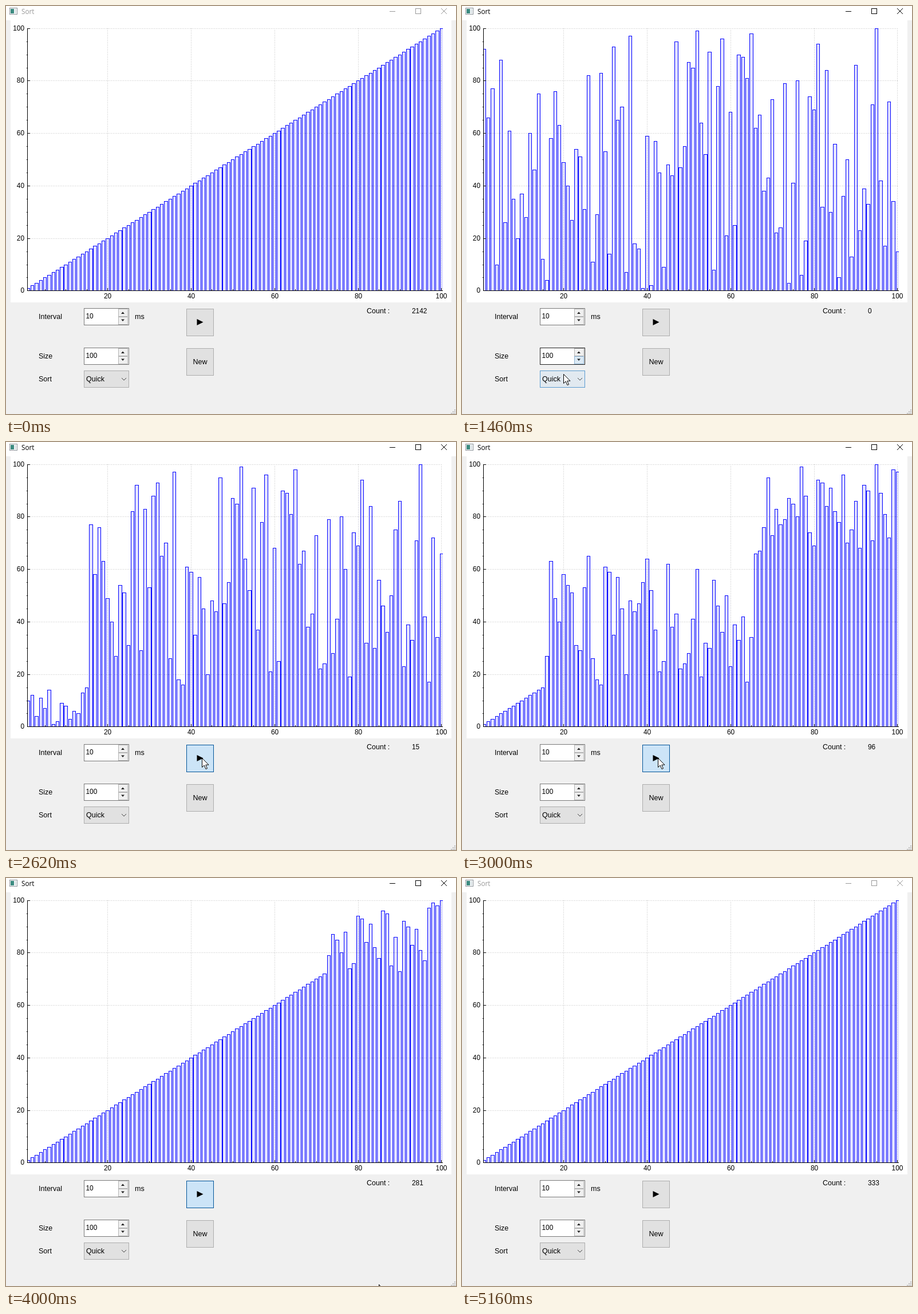
An HTML page with a canvas that plays this animation: 786 by 713 pixels, repeating every 5.32 s.

```html
<!DOCTYPE html>
<html lang="en">
<head>
<meta charset="utf-8">
<title>Sort</title>
<style>
  html, body { margin: 0; width: 100%; height: 100%; overflow: hidden; background: #f0f0f0; }
  canvas { display: block; }
</style>
</head>
<body>
<canvas id="stage" width="786" height="713"></canvas>
<script>
const ctx = document.getElementById('stage').getContext('2d');
const LOOP = 5320, TICK = 77;

const shuffled = [
  92, 66, 77, 10, 88, 26, 61, 35, 20, 37, 28, 60, 46, 75, 12, 4, 58, 76, 63, 49,
  40, 27, 54, 51, 31, 82, 11, 29, 83, 53, 14, 93, 65, 70, 7, 97, 18, 16, 1, 59,
  2, 57, 45, 9, 48, 44, 95, 47, 55, 87, 85, 99, 64, 52, 91, 8, 78, 96, 21, 68,
  25, 90, 89, 81, 98, 62, 67, 38, 43, 73, 22, 24, 79, 3, 41, 80, 6, 19, 74, 69,
  94, 32, 84, 30, 56, 5, 36, 50, 13, 86, 23, 39, 33, 71, 100, 42, 17, 72, 34, 15];
const sorted = shuffled.map((_, i) => i + 1);

// Every swap of the quick sort; the shown count advances once per partition.
function recordSort(input) {
  const a = input.slice(), steps = [{ values: input, count: 0 }];
  let count = 0;
  const swap = (i, j) => {
    [a[i], a[j]] = [a[j], a[i]];
    steps.push({ values: a.slice(), count });
  };
  const sort = (lo, hi) => {
    if (lo >= hi) return;
    let i = lo;
    for (let j = lo; j < hi; j++) if (a[j] < a[hi]) swap(i++, j);
    swap(i, hi);
    count = steps.length - 1;
    steps[count].count = count;
    sort(lo, i - 1);
    sort(i + 1, hi);
  };
  sort(0, a.length - 1);
  return steps;
}
const steps = recordSort(shuffled);

// Keys are [tick, ...values]
const progress = [[31.7, 0], [34, 20], [38, 75], [39, 97], [52, 281], [58.4, 333]];
const pointer = [
  [4, 500, 690], [7, 400, 655], [10, 338, 624], [14, 338, 624], [16, 235, 612], [17, 206, 618],
  [19, 177, 643], [21, 178, 643], [24, 240, 610], [27, 366, 566], [30, 342, 552],
  [45.5, 342, 552], [52, 651, 710]];

function at(keys, n) {
  const next = keys.findIndex(k => k[0] > n);
  if (next < 0) return keys[keys.length - 1].slice(1);
  if (next === 0) return keys[0].slice(1);
  const a = keys[next - 1], b = keys[next], p = (n - a[0]) / (b[0] - a[0]);
  return a.slice(1).map((v, i) => v + (b[i + 1] - v) * p);
}

function rect(x, y, w, h, fill, stroke) {
  ctx.fillStyle = fill;
  ctx.fillRect(x, y, w, h);
  if (!stroke) return;
  ctx.strokeStyle = stroke;
  ctx.strokeRect(x + .5, y + .5, w - 1, h - 1);
}
function text(str, x, y, { size = 12.5, align = 'left', color = '#000', font = '"Liberation Sans", Arial, sans-serif' } = {}) {
  ctx.font = `${size}px ${font}`;
  ctx.textAlign = align;
  ctx.fillStyle = color;
  ctx.fillText(str, x, y);
}
const number = (n, x, y, align = 'left') => text(n, x, y, { size: 11.9, align });
function line(color, ...points) {
  ctx.strokeStyle = color;
  ctx.beginPath();
  points.forEach(([x, y]) => ctx.lineTo(x, y));
  ctx.stroke();
}
function shape(fill, ...points) {
  ctx.fillStyle = fill;
  ctx.beginPath();
  points.forEach(([x, y]) => ctx.lineTo(x, y));
  ctx.closePath();
  ctx.fill();
}

const chartX = v => Math.round(31.4 + 7.29 * v);
const chartY = v => Math.round(497.4 - 4.587 * v);

function drawTitle(active) {
  const ink = active ? '#000' : '#999';
  rect(0, 0, 786, 25, '#fff');
  rect(6, 3, 14, 12, '#fff', '#8a9298');
  rect(8, 5, 6, 8, '#3b8a80');
  rect(15, 5, 3, 8, '#dde4e8');
  text('Sort', 27, 14, { size: 11.7, color: ink, font: '"Open Sans", "Noto Sans", sans-serif' });
  line(ink, [670, 9.5], [680, 9.5]);
  ctx.strokeRect(715.5, 4.5, 9, 9);
  line(ink, [760, 4], [770, 14]);
  line(ink, [770, 4], [760, 14]);
}

function drawChart(values) {
  rect(8, 25, 770, 493, '#fff');
  ctx.setLineDash([1, 2]);
  for (let v = 20; v <= 100; v += 20) {
    const x = chartX(v) + .5, y = chartY(v) + .5;
    line('#bebebe', [x, 39], [x, 498]);
    line('#bebebe', [37, y], [763, y]);
  }
  ctx.setLineDash([]);

  ctx.save();
  ctx.beginPath();
  ctx.rect(37, 38, 726, 460);
  ctx.clip();
  ctx.fillStyle = 'rgba(0,0,255,.11)';
  ctx.strokeStyle = '#00f';
  values.forEach((v, i) => {
    const mid = 31.4 + 7.29 * (i + 1), left = Math.round(mid - 2.9), right = Math.round(mid + 2.5);
    const box = [left + .5, chartY(v) + .5, right - left, 497 - chartY(v)];
    ctx.fillRect(...box);
    ctx.strokeRect(...box);
  });
  ctx.restore();

  line('#000', [37.5, 39], [37.5, 498]);
  line('#000', [37, 497.5], [763, 497.5]);
  for (let v = 0; v <= 100; v += 5) {
    const major = v % 20 === 0, y = chartY(v) + .5, x = chartX(v) + .5;
    line('#000', [major ? 37 : 36, y], [major ? 42 : 38, y]);
    if (v) line('#000', [x, 498], [x, major ? 493 : 495]);
    if (major) {
      number(v, 32, y + 3.5, 'right');
      if (v) number(v, x, 511, 'center');
    }
  }
}

function drawSpin(y, value, hover) {
  rect(136, y, 79, 30, '#fff', hover ? '#222' : '#7a7a7a');
  rect(196, y + 1, 17, 14, '#f0f0f0', '#b4b4b4');
  rect(196, y + 15, 17, 14, hover ? '#dceaf5' : '#f0f0f0', hover ? '#8fb4d2' : '#b4b4b4');
  shape('#222', [201, y + 10], [207, y + 10], [204, y + 6.5]);
  shape('#222', [201, y + 19.5], [207, y + 19.5], [204, y + 23]);
  number(value, 139.5, y + 18);
}

const NORMAL = ['#e1e1e1', '#adadad'], HOVER = ['#e5f1fb', '#0078d7'], PRESSED = ['#cce4f7', '#005499'];

function playColors(n) {
  if (n < 26 || n >= 61) return NORMAL;
  if (n < 32) return HOVER;
  if (n < 59) return PRESSED;
  return n < 60 ? ['#d3e3f0', '#38709c'] : ['#dae2e9', '#728ea5'];
}
function newColors(n) {
  if (n < 10 || n >= 17) return NORMAL;
  if (n < 13) return ['#d8e9f8', '#00549f'];
  return n < 16 ? HOVER : ['#e3e9ee', '#5793c2'];
}

function drawControls(n, count) {
  text('Interval', 57, 547);
  drawSpin(528, 10, false);
  text('ms', 225, 547);
  text('Size', 57, 616);
  drawSpin(597, 100, n >= 17 && n < 21);
  text('Sort', 57, 656);
  rect(136, 637, 79, 30, ...(n >= 18 && n < 23 ? ['#e1e9f0', '#5a9bd0'] : NORMAL));
  text('Quick', 140, 656);
  line('#444', [202, 650], [206, 654], [210, 650]);

  rect(315, 529, 48, 48, ...playColors(n));
  shape('#000', [333.5, 547], [333.5, 558], [344.5, 552.5]);
  rect(315, 598, 48, 48, ...newColors(n));
  text('New', 339, 626, { align: 'center' });

  text('Count :', 630, 537);
  number(count, 709, 537);
  for (let r = 0; r < 3; r++)
    for (let c = 0; c <= r; c++) rect(783 - 3 * c, 705 + 3 * r, 2, 2, '#bfbfbf');
}

function drawPointer(n) {
  if (n < 4 || n > 52) return;
  const [x, y] = at(pointer, n);
  if (n === 10 || n === 11) {
    ctx.fillStyle = 'rgba(240,236,40,.68)';
    ctx.beginPath();
    ctx.arc(x, y, 11.5, 0, 2 * Math.PI);
    ctx.fill();
  }
  ctx.save();
  ctx.translate(Math.round(x) + .5, Math.round(y) + .5);
  shape('#fff', [0, 0], [0, 16], [3.7, 12.5], [6.5, 19], [9, 18], [6.3, 11.7], [11.5, 11.7]);
  ctx.strokeStyle = '#000';
  ctx.stroke();
  ctx.restore();
}

// The screen refreshes once per tick.
function draw(ms) {
  const n = Math.floor((ms % LOOP + 12) / TICK);
  const step = n < 12
    ? { values: sorted, count: 2142 }
    : steps[Math.floor(at(progress, n)[0] + 1e-6)];
  rect(0, 0, 786, 713, '#f0f0f0');
  drawTitle(n >= 10 && n < 67);
  drawChart(step.values);
  drawControls(n, step.count);
  drawPointer(n);
}

const start = performance.now();
function loop() {
  draw(performance.now() - start);
  requestAnimationFrame(loop);
}
loop();
</script>
</body>
</html>
```
